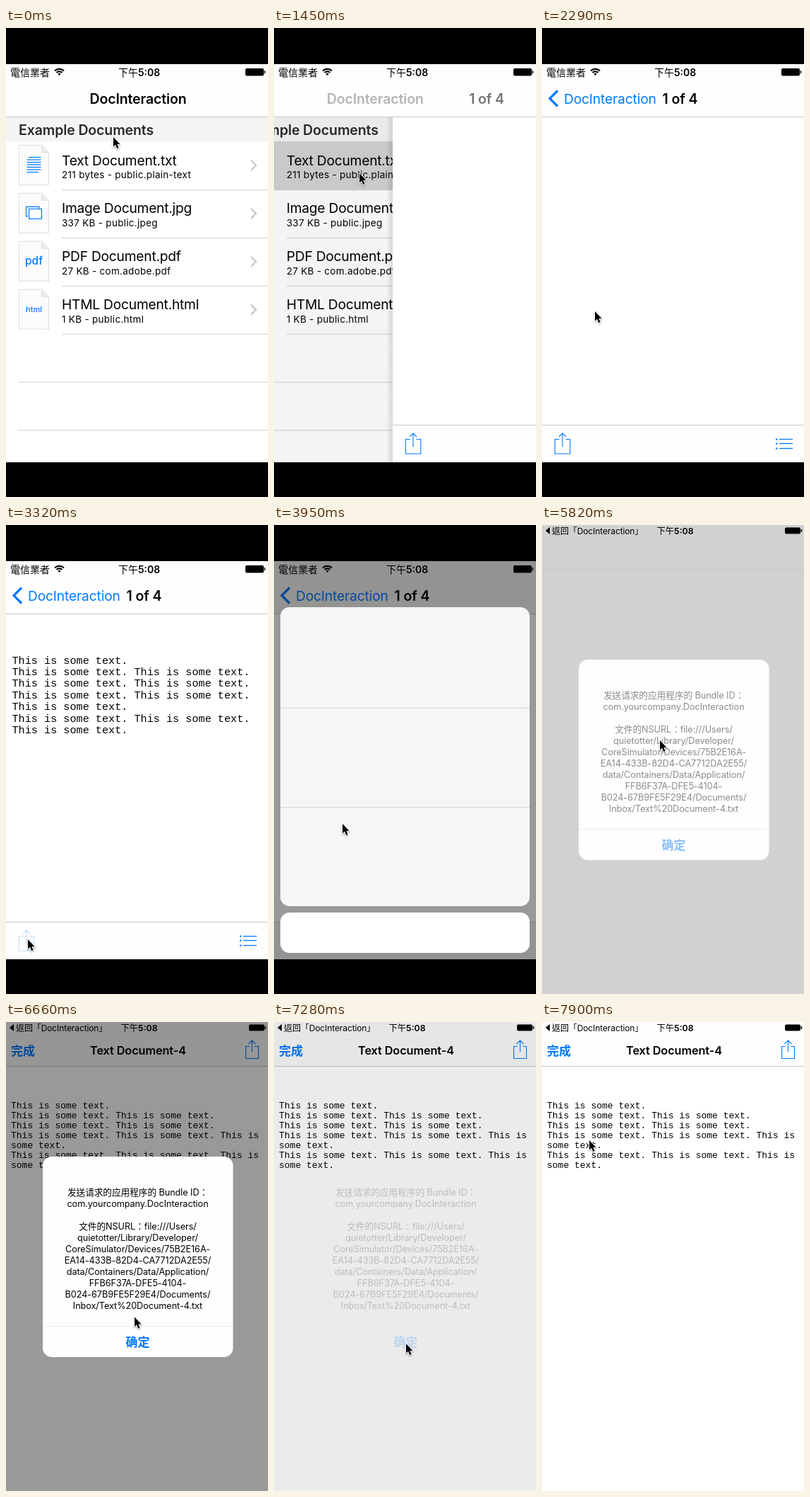
Recreate the animation shown at these times as an HTML page with a canvas. Size 371 by 662 pixels, loop 8000 ms.

```html
<!DOCTYPE html>
<html lang="zh-Hant">
<head>
<meta charset="utf-8">
<title>Document interaction</title>
<style>
  html, body { margin: 0; width: 100%; height: 100%; overflow: hidden; background: #000; }
  canvas { display: block; }
</style>
</head>
<body>
<canvas id="stage" width="371" height="662"></canvas>
<script>
const ctx = document.getElementById('stage').getContext('2d');
const W = 371, H = 662, LOOP = 8000, STEP = 7900 / 38;
const TOP = 51, BOTTOM = 613, ROW = 67.87;
const BLUE = '#007aff', LINE = '#c8c7cc', RULE = '#d5d5d7';
const SANS = 'Inter, "Noto Sans CJK TC", sans-serif';
const MONO = '"Liberation Mono", monospace';

// Linear interpolation over [tick, value, ...] keys.
function key(tick, keys) {
  const i = keys.findIndex(k => k[0] > tick);
  if (i === 0) return keys[0].slice(1);
  if (i < 0) return keys[keys.length - 1].slice(1);
  const a = keys[i - 1], b = keys[i], f = (tick - a[0]) / (b[0] - a[0]);
  return a.slice(1).map((v, j) => v + (b[j + 1] - v) * f);
}

const CURSOR = [[0, 152, 154], [2, 138, 205], [4, 108, 268], [5, 109, 250], [6, 119, 212],
  [7, 121, 205], [9, 121, 205], [11, 75, 400], [12, 42, 520], [13, 31, 585], [17, 31, 585],
  [20, 130, 340], [21, 167, 304], [29, 167, 304], [33, 187, 454], [35, 187, 454],
  [36, 165, 400], [37, 125, 302], [38, 67, 167]];
const PUSH = [[6, 0], [7, 0.547], [8, 0.95], [9, 1]];
const SHEET = [[16, 0], [17, 0.5], [18, 0.95], [19, 1], [23, 1], [24, 0.3], [25, 0]];
const SWITCH = [[25, 0], [26, 0.55], [27, 1]];
const ALERT = [[27, 0], [28, 0.45], [29, 1], [34, 1], [35, 0.2], [36, 0]];
const PREVIEW = [[28, 0], [29, 0.5], [30, 0.95], [31, 1]];

function rect(x, y, w, h, color) {
  ctx.fillStyle = color;
  ctx.fillRect(x, y, w, h);
}

function rounded(x, y, w, h, r, color) {
  ctx.fillStyle = color;
  ctx.beginPath();
  ctx.roundRect(x, y, w, h, r);
  ctx.fill();
}

function stroke(points, color, width = 1) {
  ctx.strokeStyle = color;
  ctx.lineWidth = width;
  ctx.beginPath();
  points.forEach(([x, y]) => ctx.lineTo(x, y));
  ctx.stroke();
}

function polygon(points, color) {
  ctx.fillStyle = color;
  ctx.beginPath();
  points.forEach(([x, y]) => ctx.lineTo(x, y));
  ctx.closePath();
  ctx.fill();
}

function text(s, x, y, size, { color = '#000', weight = 400, space = 0, align = 'left', font = SANS } = {}) {
  ctx.font = `${weight} ${size}px ${font}`;
  ctx.letterSpacing = space + 'px';
  ctx.textAlign = align;
  ctx.fillStyle = color;
  ctx.fillText(s, x, y);
}

function layer(alpha, dx, dy, draw) {
  if (alpha <= 0) return;
  ctx.save();
  ctx.globalAlpha *= Math.min(1, alpha);
  ctx.translate(dx, dy);
  draw();
  ctx.restore();
}

function clip(x, y, w, h, draw) {
  ctx.save();
  ctx.beginPath();
  ctx.rect(x, y, w, h);
  ctx.clip();
  draw();
  ctx.restore();
}

function clock(x, y, size) {
  text('下午', x, y, size);
  text('5:08', x + 2 * size, y, size, { weight: 600 });
}

function battery(x, y, w, h) {
  rounded(x, y, w, h, 2, '#000');
  rect(x + w + 0.7, y + h / 2 - 2, 1.5, 4, '#000');
}

function wifi(x, y) {
  ctx.strokeStyle = '#000';
  ctx.lineWidth = 2.2;
  for (const r of [9.2, 5.6]) {
    ctx.beginPath();
    ctx.arc(x, y, r, -Math.PI * 0.75, -Math.PI * 0.25);
    ctx.stroke();
  }
  ctx.fillStyle = '#000';
  ctx.beginPath();
  ctx.moveTo(x, y);
  ctx.arc(x, y, 3, -Math.PI * 0.75, -Math.PI * 0.25);
  ctx.fill();
}

// x, y is the arrow tip; w is the box width.
function shareIcon(x, y, w, boxTop, boxHeight, arrow) {
  const l = x - w / 2, r = x + w / 2, t = y + boxTop, b = t + boxHeight, gap = w * 0.2;
  stroke([[x - gap, t], [l, t], [l, b], [r, b], [r, t], [x + gap, t]], BLUE, 1.1);
  stroke([[x, y], [x, y + arrow]], BLUE, 1.1);
  stroke([[x - 5, y + 5], [x, y], [x + 5, y + 5]], BLUE, 1.1);
}

function listIcon() {
  for (const y of [580.5, 586.5, 593.5]) {
    rect(331, y - 1, 2.2, 2.2, BLUE);
    stroke([[336, y], [355, y]], BLUE, 1.3);
  }
}

function fileIcon(y, draw) {
  const sheet = [[18.5, y], [50.5, y], [60.5, y + 10], [60.5, y + 56], [18.5, y + 56], [18.5, y]];
  const fold = [[50.5, y], [50.5, y + 10], [60.5, y + 10]];
  polygon(sheet, '#fcfcfc');
  stroke(sheet, '#dedede');
  polygon(fold, '#ececec');
  stroke(fold, '#dedede');
  draw(y);
}

function linesGlyph(y) {
  for (let i = 0; i < 7; i++) {
    stroke([[i ? 29.5 : 32, y + 17 + i * 3.5], [i === 6 ? 46 : 49.5, y + 17 + i * 3.5]], BLUE, 1.2);
  }
}

function imageGlyph(y) {
  stroke([[31, y + 32.5], [28.5, y + 32.5], [28.5, y + 19], [47, y + 19], [47, y + 21.5]], BLUE, 1.2);
  ctx.strokeRect(32.5, y + 22, 18, 14);
}

const word = (s, size, drop) => y =>
  text(s, 39.5, y + drop, size, { color: BLUE, weight: 500, align: 'center' });

const ROWS = [
  ['Text Document.txt', '211 bytes - public.plain-text', linesGlyph],
  ['Image Document.jpg', '337 KB - public.jpeg', imageGlyph],
  ['PDF Document.pdf', '27 KB - com.adobe.pdf', word('pdf', 15.5, 33)],
  ['HTML Document.html', '1 KB - public.html', word('html', 11, 32)],
];

function list(selected) {
  rect(0, 125, W, 488, '#fff');
  rect(0, 125, W, 35, '#f4f4f2');
  text('Example Documents', 18, 150.5, 19.5, { weight: 600, space: -0.12, color: '#2a2a2c' });
  for (let i = 0; i < 6; i++) {
    const left = i < 4 ? 79 : 18;
    rect(left, 228 + i * ROW, W - left, 1.1, RULE);
  }
  if (selected) rect(0, 160, W, 69, '#d2d2d2');
  ROWS.forEach(([name, info, glyph], i) => {
    const y = 160 + i * ROW;
    fileIcon(y + 5.5, glyph);
    text(name, 79, y + 33.5, 19.2, { space: -0.22 });
    text(info, 79, y + 52, 13.5, { space: 0.28 });
    stroke([[347, y + 27], [354, y + 34], [347, y + 41]], LINE, 2.2);
  });
}

const SENTENCE = 'This is some text.';
const TWICE = SENTENCE + ' ' + SENTENCE;
const NARROW = [SENTENCE, TWICE, TWICE, TWICE, SENTENCE, TWICE, SENTENCE];
const LONG = TWICE + ' This is';
const WIDE = [SENTENCE, TWICE, TWICE, LONG, 'some text.', LONG, 'some text.'];

function lines(rows, x, y, lead, size) {
  rows.forEach((s, i) => text(s, x, y + i * lead, size, { font: MONO }));
}

function detail(tick, barColor) {
  rect(0, 125, W, 488, '#fff');
  if (tick >= 12) lines(NARROW, 8.5, 195.5, 16.4, 15.18);
  rect(0, 560, W, 53, barColor);
  rect(0, 560, W, 1, LINE);
  layer(tick === 15 || tick === 16 ? 0.25 : 1, 0, 0, () => shareIcon(29, 572, 21.5, 8.5, 20.5, 19));
  listIcon();
}

function navBar(p, barColor) {
  const bold = { weight: 600, space: -0.12, align: 'center' };
  rect(0, TOP, W, 125 - TOP, barColor);
  rect(0, 125, W, 1, LINE);
  text('電信業者', 6, 67.5, 14);
  wifi(75.5, 67);
  clock(159, 67.5, 14);
  battery(339, 57, 26, 10.5);
  layer(1 - 1.3 * p, -80 * p, 0, () => text('DocInteraction', 187, 107, 19.5, bold));
  layer(p, 233 * (1 - p), 0, () => text('1 of 4', 195.5, 107, 19.5, bold));
  layer((p - 0.6) / 0.4, 80 * (1 - p), 0, () => {
    stroke([[22, 88.5], [11, 99.5], [22, 110.5]], BLUE, 3.2);
    text('DocInteraction', 31, 107, 19.2, { color: BLUE, space: -0.15 });
  });
}

function sheet(s) {
  if (s <= 0) return;
  rect(0, TOP, W, BOTTOM - TOP, `rgba(0,0,0,${0.4 * s})`);
  layer(1, 0, 500 * (1 - s), () => {
    rounded(9, 116, 353, 422, 13, '#f6f6f6');
    rounded(9, 547, 353, 57, 13, '#fff');
    for (const y of [258, 398]) rect(9, y, 353, 1, RULE);
  });
}

function browser(tick) {
  const [p] = key(tick, PUSH), edge = W * (1 - p);
  const barColor = tick < 17 ? '#fefefe' : '#f4f4f2';
  rect(0, 0, W, H, '#000');
  clip(0, TOP, W, BOTTOM - TOP, () => {
    if (p < 1) {
      layer(1, -112 * p, 0, () => list(tick >= 7));
      rect(0, 125, W, 488, `rgba(0,0,0,${0.08 * p})`);
    }
    if (p > 0) {
      const shade = ctx.createLinearGradient(edge - 9, 0, edge, 0);
      shade.addColorStop(0, 'rgba(0,0,0,0)');
      shade.addColorStop(1, 'rgba(0,0,0,0.12)');
      rect(edge - 9, 125, 9, 488, shade);
      layer(1, edge, 0, () => detail(tick, barColor));
    }
    navBar(p, barColor);
    sheet(key(tick, SHEET)[0]);
  });
}

function page(barColor, lineColor) {
  rect(0, 0, W, H, '#fff');
  rect(0, 0, W, 62, barColor);
  rect(0, 62, W, 1, lineColor);
}

function viewer(tick) {
  const [shown] = key(tick, PREVIEW);
  page('#fff', '#f0f0f0');
  layer(shown, 0, H * (1 - shown), () => {
    page(tick < 36 ? '#f9f9f9' : '#fefefe', LINE);
    text('完成', 7, 46.5, 17, { color: BLUE, weight: 600 });
    text('Text Document-4', 187, 46, 16.3, { weight: 600, space: -0.1, align: 'center' });
    shareIcon(348.5, 26, 18, 8.5, 17, 16);
    lines(WIDE, 7, 122, 14, 13);
  });
  polygon([[11, 3], [5, 8], [11, 13]], '#000');
  text('返回「DocInteraction」', 14, 12.5, 12, { space: -0.1 });
  clock(162.5, 12.5, 12.3);
  battery(344, 3.5, 22, 9);
}

const MESSAGE = [
  '发送请求的应用程序的 Bundle ID：', 'com.yourcompany.DocInteraction', '',
  '文件的NSURL：file:///Users/', 'quietotter/Library/Developer/',
  'CoreSimulator/Devices/75B2E16A-', 'EA14-433B-82D4-CA7712DA2E55/',
  'data/Containers/Data/Application/', 'FFB6F37A-DFE5-4104-',
  'B024-67B9FE5F29E4/Documents/', 'Inbox/Text%20Document-4.txt',
];

function alertBox(tick) {
  const [a] = key(tick, ALERT);
  if (a <= 0) return;
  rect(0, 0, W, H, `rgba(0,0,0,${0.4 * a})`);
  layer(tick < 30 ? 1 : (a - 0.2) / 0.8, 0, 0, () => {
    rounded(52, 190, 269.5, 283, 13, '#fefefe');
    rect(52, 429, 269.5, 1, '#ececec');
  });
  layer(a, 0, 0, () => {
    MESSAGE.forEach((s, i) => text(s, 186.5, 245 + i * 16, 12.7, { space: -0.08, align: 'center' }));
    text('确定', 186.5, 458, 17, { color: BLUE, weight: 600, align: 'center' });
  });
}

function cursor(tick) {
  const [x, y] = key(tick, CURSOR);
  const arrow = [[0, 0], [0, 13.5], [3, 10.8], [5.2, 16], [7.6, 15], [5.4, 10], [9.6, 10], [0, 0]];
  layer(1, x, y, () => {
    ctx.lineJoin = 'round';
    ctx.shadowColor = 'rgba(0,0,0,0.4)';
    ctx.shadowBlur = 2;
    ctx.shadowOffsetY = 1;
    stroke(arrow, '#fff', 2);
    ctx.shadowColor = 'transparent';
    polygon(arrow, '#000');
  });
}

function draw(ms) {
  const tick = Math.min(38, Math.floor((ms % LOOP + 7) / STEP));
  const [s] = key(tick, SWITCH);
  if (s < 1) layer(1, -W * s, 0, () => browser(tick));
  if (s > 0) layer(1, W * (1 - s), 0, () => viewer(tick));
  alertBox(tick);
  cursor(tick);
}

const start = performance.now();
function loop() {
  draw(performance.now() - start);
  requestAnimationFrame(loop);
}
loop();
</script>
</body>
</html>
```
